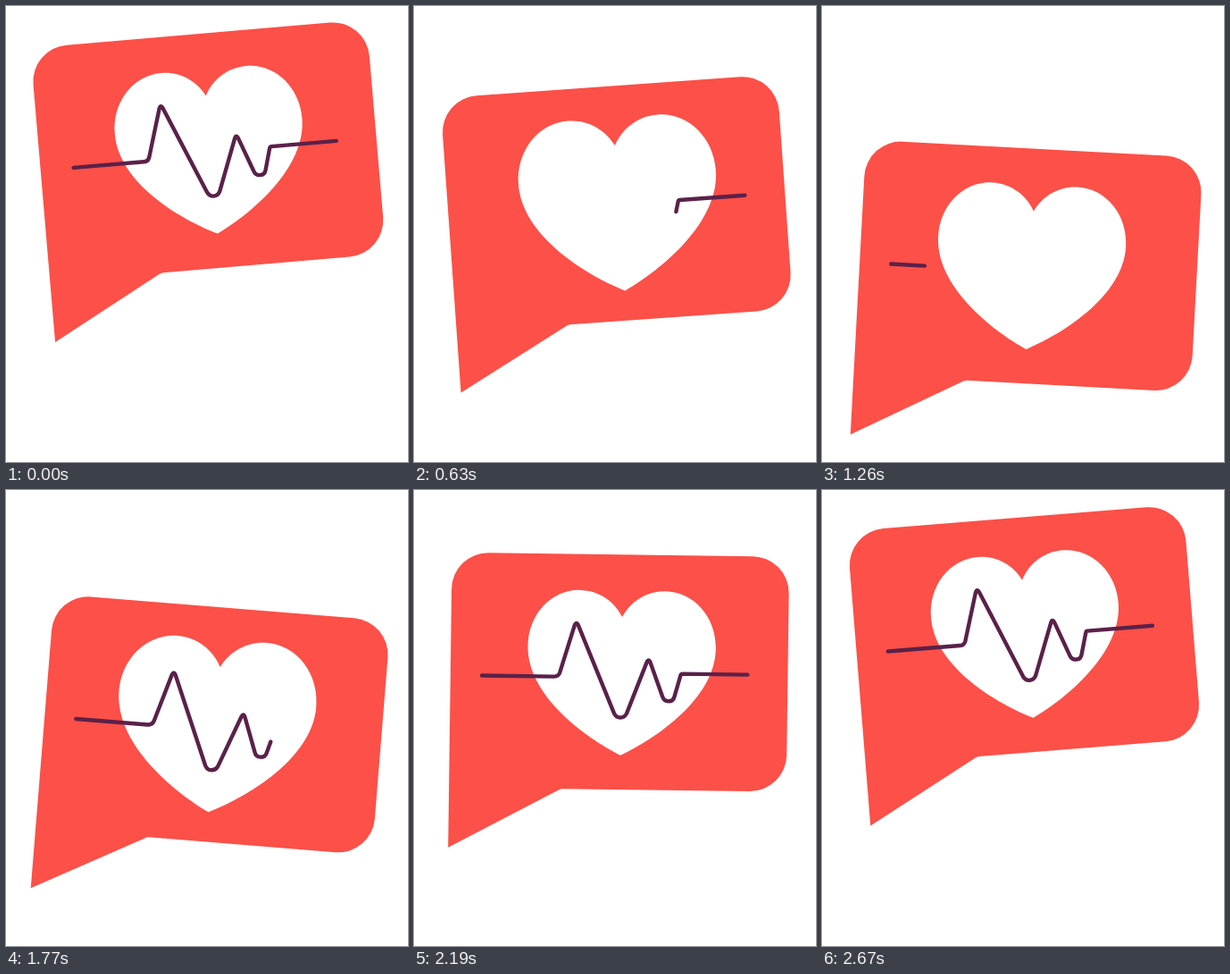
An HTML page for the animation above (2700 ms loop, 450x510 px).

```html
<!DOCTYPE html>
<html lang="en">
<head>
<meta charset="utf-8">
<title>Heartbeat message</title>
<style>
  html, body { margin: 0; width: 100%; height: 100%; overflow: hidden; background: #fff; }
  svg { display: block; width: 100%; height: 100%; }
</style>
</head>
<body>
<svg viewBox="0 0 450 510">
  <g id="bubble">
    <path fill="#fc5048" d="M-188.8 165.1V-124.1A41 41 0 0 1-147.8-165.1H147.8A41 41 0 0 1 188.8-124.1V56.7A41 41 0 0 1 147.8 97.7H-61.5Q-63.7 97.7-65.6 98.8Z"/>
    <path id="heart" fill="#fff" d="M0 59.4C-40 40-105.2-6-105.2-61.3C-105.2-97-79.5-124.8-47.7-124.8C-27-124.8-9-113 0-95.2C9-113 27-124.8 47.7-124.8C79.5-124.8 105.2-97 105.2-61.3C105.2-6 40 40 0 59.4Z"/>
    <path id="pulse" pathLength="1" fill="none" stroke="#5a2149" stroke-width="4.4" stroke-linecap="round" stroke-linejoin="round"
      d="M-153.6-27.7H-73Q-68-27.6-66.5-32L-50.5-85.5Q-48.5-90-46.5-85.5L-5 12.7C-2 18.8 6 18.8 9 12.5L30.8-45Q32.7-49.5 34.7-45L48.8-7C51 0 60.5 0 62.2-7L69-31.5Q69.3-32.6 70.5-32.6H143.8"/>
  </g>
</svg>
<script>
  const LOOP = 2700, HALF = LOOP / 2;
  const ERASE = 2670, DRAW = 1110, SWEEP = 900;
  const [bubble, heart, pulse] = ['bubble', 'heart', 'pulse'].map(id => document.getElementById(id));

  const ease = (t, from, to) => {
    const u = Math.min(1, Math.max(0, (t - from) / (to - from)));
    return u * u * (3 - 2 * u);
  };
  const since = (t, start) => (t - start + LOOP) % LOOP;
  // Eased there-and-back swing, 0 at the start and 1 half a loop later
  const swing = t => ease(t, 0, HALF) - ease(t, HALF, LOOP);
  const beat = t => ease(t, 150, 495) - ease(t, 495, 840);

  function render(t) {
    const y = 195.6 + 130.5 * swing(t);
    const angle = -6 + 11 * swing(since(t, 270));
    bubble.setAttribute('transform', `translate(229.2 ${y}) rotate(${angle})`);

    const erasing = since(t, ERASE), drawing = since(t, DRAW);
    const scale = 1 + 0.1 * (beat(erasing) + beat(drawing));
    heart.setAttribute('transform', `translate(2.65 -34) scale(${scale}) translate(0 34)`);

    const onDraw = t >= DRAW && t < ERASE;
    const a = onDraw ? 0 : ease(erasing, 0, SWEEP);
    const b = onDraw ? ease(drawing, 0, SWEEP) : 1;
    pulse.style.visibility = b - a > 0.0005 ? 'visible' : 'hidden';
    pulse.setAttribute('stroke-dasharray', `${b - a} 2`);
    pulse.setAttribute('stroke-dashoffset', -a);
  }

  const began = performance.now();
  function tick() {
    render((performance.now() - began) % LOOP);
    requestAnimationFrame(tick);
  }
  tick();
</script>
</body>
</html>
```
